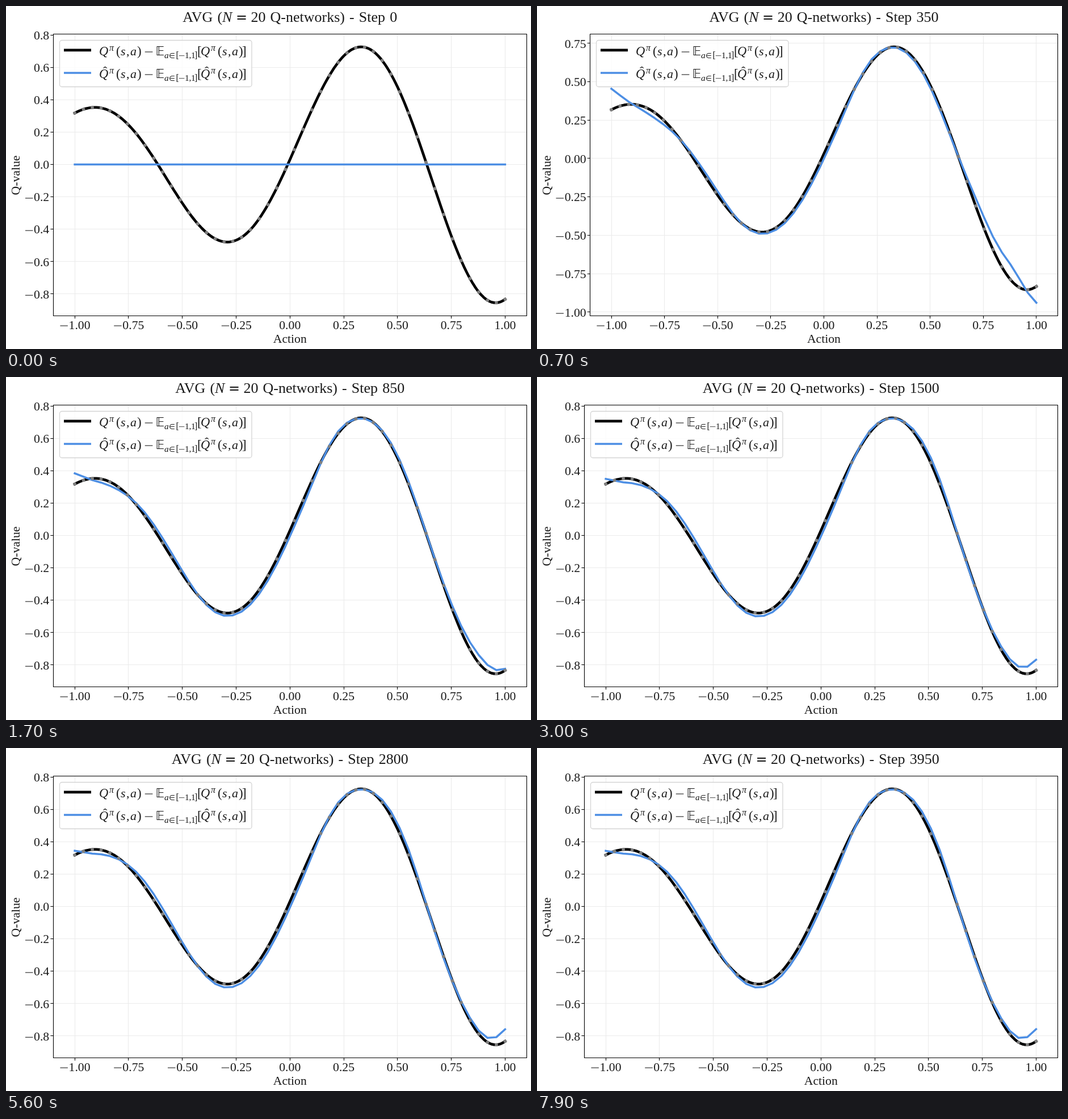
These frames come from a looping animation (925x605 px, 8000 ms). An HTML page with a canvas:

```html
<!DOCTYPE html>
<html lang="en">
<head>
<meta charset="utf-8">
<title>Q-value fit</title>
<style>
html, body { margin: 0; width: 925px; height: 605px; overflow: hidden; background: #fff; }
canvas { display: block; }
</style>
</head>
<body>
<canvas id="stage" width="925" height="605"></canvas>
<script>
const ctx = document.getElementById('stage').getContext('2d');
const LOOP = 8000, STEP = 100, POINTS = 50;
const TOP = 49.5, BOTTOM = 546, RIGHT = 917.3;
const BLUE = '#4c8ee4', INK = '#1a1a1a', SIZE = 21.7;
const roman = size => `${size}px "Liberation Serif", "Times New Roman", serif`;
const italic = size => 'italic ' + roman(size);
const symbol = size => `${size}px "DejaVu Sans", sans-serif`;

const truth = x => (0.6 + 0.3 * x) * Math.sin(5 * x) + 0.03;
const gridX = k => -1 + 2 * k / (POINTS - 1);
const mix = (a, b, p) => a + (b - a) * p;

// Crests and troughs [x, error]: the lasting misfit, and the one that training removes
const lasting = [[-1.1, 0.08], [-0.9, -0.028], [-0.63, 0.037], [-0.3, -0.022], [0.04, -0.038],
  [0.22, 0.012], [0.33, -0.002], [0.53, 0.036], [0.7, -0.011], [0.88, 0.02], [1.12, 0.13]];
const fading = [[-1.2, 0.22], [-0.74, -0.04], [-0.45, 0.012], [0.3, 0.002],
  [0.54, -0.055], [0.76, 0.08], [0.87, 0.085], [1.08, -0.32]];

// Half a cosine between neighbouring crests and troughs
function wave(keys, x) {
  const i = keys.findIndex(key => key[0] > x);
  const [x0, y0] = keys[i - 1], [x1, y1] = keys[i];
  return mix(y0, y1, (1 - Math.cos(Math.PI * (x - x0) / (x1 - x0))) / 2);
}

function estimate(t) {
  const learned = 1 - (1 - Math.min(1, t / 700)) ** 3;
  const fade = 1 / (1 + (t / 1450) ** 4);
  return Array.from({ length: POINTS }, (_, k) => {
    const x = gridX(k);
    return [x, learned * (truth(x) + wave(lasting, x) + fade * wave(fading, x))];
  });
}

const black = Array.from({ length: 201 }, (_, i) => [i / 100 - 1, truth(i / 100 - 1)]);
const dots = Array.from({ length: POINTS }, (_, k) => [gridX(k), truth(gridX(k))]);

function put(str, x, y, font = roman(SIZE), align = 'left') {
  ctx.fillStyle = INK;
  ctx.font = font;
  ctx.textAlign = align;
  ctx.fillText(str, x, y);
}

function curve(points, color, width) {
  ctx.strokeStyle = color;
  ctx.lineWidth = width;
  ctx.beginPath();
  points.forEach(p => ctx.lineTo(...p));
  ctx.stroke();
}

const line = (x1, y1, x2, y2, color = '#000', width = 1.1) =>
  curve([[x1, y1], [x2, y2]], color, width);

const minus = (x, y, size) =>
  line(x + 0.08 * size, y - 0.25 * size, x + 0.7 * size, y - 0.25 * size, INK, 0.05 * size);

// Number with a wide minus sign, centred on x or ending there
function number(v, digits, x, y, align) {
  const str = Math.abs(v).toFixed(digits), sign = v < 0 ? 0.778 * SIZE : 0;
  ctx.font = roman(SIZE);
  const w = ctx.measureText(str).width + sign;
  const x0 = x - (align === 'right' ? w : w / 2);
  if (sign) minus(x0, y, SIZE);
  put(str, x0 + sign, y);
}

function qTerm(x, y, hat) {
  put('Q', x, y, italic(22.5));
  if (hat) put('ˆ', x + 7, y - 5, roman(22));
  put('π', x + 18, y - 8, italic(16));
  put('(', x + 30, y, roman(23));
  put('s', x + 38, y, italic(22));
  put(',', x + 48, y, roman(22));
  put('a', x + 55, y, italic(22));
  put(')', x + 67, y, roman(23));
}

function formula(x, y, hat) {
  qTerm(x, y, hat);
  minus(x + 79, y, 22);
  put('𝔼', x + 99.5, y, symbol(21.5));
  const sy = y + 5;
  put('a', x + 115, sy, italic(15.5));
  put('∈', x + 123, sy, symbol(12.5));
  put('[', x + 135.5, sy, roman(16));
  minus(x + 139.5, sy, 15.5);
  put('1', x + 151, sy, roman(15.5));
  put(',', x + 158.5, sy, roman(15.5));
  put('1', x + 162, sy, roman(15.5));
  put(']', x + 168, sy, roman(16));
  put('[', x + 173, y, roman(23));
  qTerm(x + 179, y, hat);
  put(']', x + 252, y, roman(23));
}

function legend(x) {
  ctx.fillStyle = 'rgba(255,255,255,0.8)';
  ctx.strokeStyle = '#d4d4d4';
  ctx.lineWidth = 1.3;
  ctx.beginPath();
  ctx.roundRect(x, 60.5, 338.5, 82, 4);
  ctx.fill();
  ctx.stroke();
  line(x + 7.5, 77.9, x + 55.5, 77.9, '#000', 4.7);
  line(x + 7.5, 117.9, x + 55.5, 117.9, BLUE, 3.5);
  formula(x + 69.5, 86.5, false);
  formula(x + 69.5, 126.5, true);
}

function title(step, cx) {
  const runs = [['AVG (', roman(26)], ['N', italic(26)], [' ', roman(26)], ['=', symbol(24)],
    [` 20 Q-networks) - Step ${step}`, roman(26)]];
  ctx.wordSpacing = '1.6px';
  const widths = runs.map(([str, font]) => {
    ctx.font = font;
    return ctx.measureText(str).width;
  });
  let x = cx - widths.reduce((a, b) => a + b) / 2;
  runs.forEach(([str, font], i) => {
    put(str, x, 28, font);
    x += widths[i];
  });
  ctx.wordSpacing = '0px';
}

function draw(t) {
  const fit = estimate(t);
  const all = [...fit, ...black].map(p => p[1]);
  const lo = Math.min(...all), hi = Math.max(...all), pad = (hi - lo) * 0.05;
  const yMin = lo - pad, yMax = hi + pad;
  const count = Math.floor(yMax / 0.2) - Math.ceil(yMin / 0.2) + 1;
  const [gap, digits, left] = count > 9 ? [0.25, 2, 93.6] : [0.2, 1, 83.2];
  const cx = (left + RIGHT) / 2;
  const px = x => cx + x * (RIGHT - left) / 2.2;
  const py = y => TOP + (yMax - y) / (yMax - yMin) * (BOTTOM - TOP);
  const snap = v => Math.floor(v) + 0.5;
  const toScreen = ([x, y]) => [px(x), py(y)];

  ctx.fillStyle = '#fff';
  ctx.fillRect(0, 0, 925, 605);
  ctx.lineJoin = 'round';

  for (let i = -4; i <= 4; i++) {
    const x = snap(px(i / 4));
    line(x, TOP, x, BOTTOM, '#ebebeb');
    line(x, BOTTOM, x, BOTTOM + 5.3);
    number(i / 4, 2, px(i / 4), 569.5, 'center');
  }
  for (let i = Math.ceil(yMin / gap); i * gap <= yMax; i++) {
    const y = snap(py(i * gap));
    line(left, y, RIGHT, y, '#ebebeb');
    line(left - 4.8, y, left, y);
    number(i * gap, digits, left - 7, py(i * gap) + 7.8, 'right');
  }

  ctx.lineCap = 'square';
  curve(black.map(toScreen), '#000', 4.7);
  curve(fit.map(toScreen), BLUE, 3.5);
  ctx.lineCap = 'butt';
  ctx.fillStyle = '#808080';
  dots.map(toScreen).forEach(([x, y]) => {
    ctx.beginPath();
    ctx.arc(x, y, 2.9, 0, 7);
    ctx.fill();
  });

  ctx.strokeStyle = '#000';
  ctx.lineWidth = 1.1;
  ctx.strokeRect(snap(left), snap(TOP), snap(RIGHT) - snap(left), snap(BOTTOM) - snap(TOP));
  legend(snap(left) + 11);

  title(t / STEP * 50, cx);
  put('Action', cx, 594, roman(SIZE), 'center');
  ctx.save();
  ctx.translate(23.5, 298.5);
  ctx.rotate(-Math.PI / 2);
  put('Q-value', 0, 0, roman(SIZE), 'center');
  ctx.restore();
}

const start = performance.now();
function tick() {
  const t = (performance.now() - start) % LOOP;
  draw(Math.floor(t / STEP) * STEP);
  requestAnimationFrame(tick);
}
tick();
</script>
</body>
</html>
```
